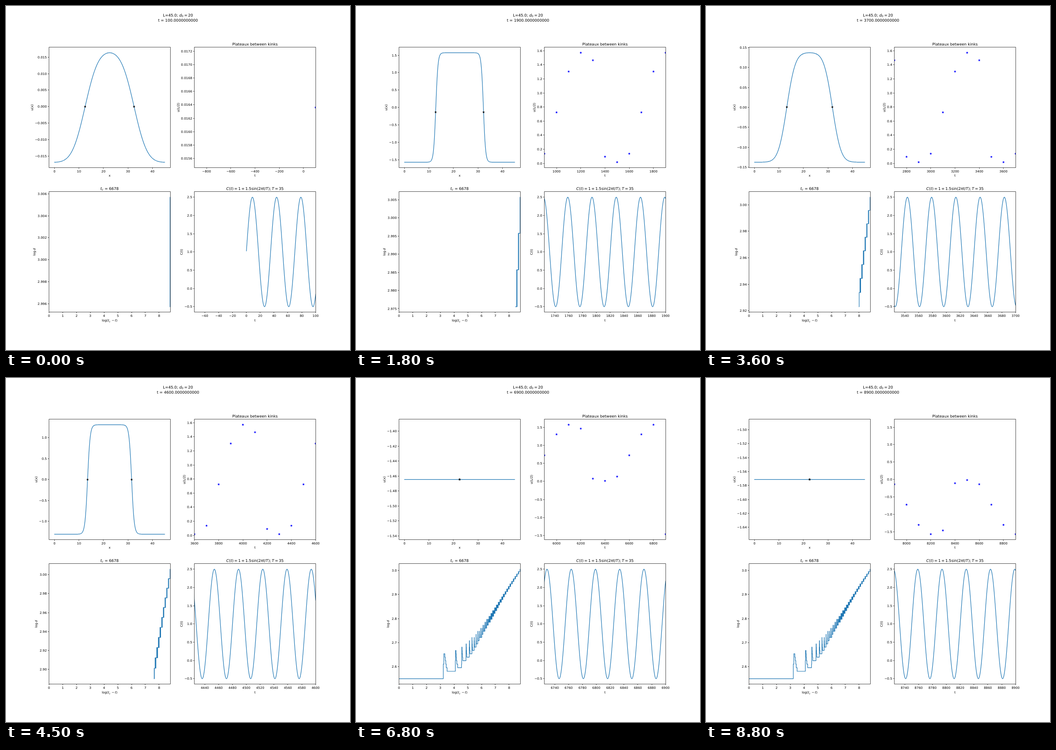
These frames come from a looping animation (748 px wide and 748 px high, 8900 ms). An HTML page:

```html
<!DOCTYPE html>
<html lang="en">
<head>
<meta charset="utf-8">
<title>Kink dynamics</title>
<style>
  html, body { margin: 0; width: 100%; height: 100%; overflow: hidden; background: #fff; }
  #stage { display: block; width: 748px; height: 748px; }
  text { font-family: "DejaVu Sans", sans-serif; text-rendering: geometricPrecision; white-space: pre; }
  .i { font-style: italic; }
  .axis { fill: none; stroke: #000; stroke-width: .7; }
  .line { fill: none; stroke: #1f77b4; stroke-width: 1.2; stroke-linejoin: round; stroke-linecap: square; }
  .star { stroke-width: .69; stroke-linejoin: bevel; }
</style>
</head>
<body>
<svg id="stage" viewBox="0 0 748 748"></svg>
<script>
const SIZE = 748, PT = SIZE / 15 / 72;
const SMALL = 10 * PT, LARGE = 12 * PT, TICK = 3.5 * PT;
const W = .775 * SIZE / 2.2, H = .77 * SIZE / 2.2;
const LEFT = [.125 * SIZE, .9 * SIZE - W], TOP = [.12 * SIZE, .89 * SIZE - H];

const LENGTH = 45, PERIOD = 35, T_END = 8900, T_C = 6678, STEP_MS = 100;
const forcing = t => 1 + 1.5 * Math.sin(2 * Math.PI * t / PERIOD);

// u_t = u_xx + C(t) u - u^3 on the left half of a mirror-symmetric domain
const N = 225, DX = LENGTH / 2 / N, DT = .1;
const START_KINK = 12.5, LAST_KINK = 16.2;
const sweep = new Float64Array(N + 1);

// Crank-Nicolson for the linear part, explicit cubic; tridiagonal solve
function advance(u, next, t) {
  const r = DT / 2 / (DX * DX);
  const keep = 1 - 2 * r + DT / 2 * forcing(t), diag = 1 + 2 * r - DT / 2 * forcing(t + DT);
  for (let i = 0; i <= N; i++) {
    const a = i ? u[i - 1] : u[1], b = i < N ? u[i + 1] : u[N - 1], v = u[i];
    const rhs = keep * v + r * (a + b) - DT * v * v * v;
    const low = i === 0 ? 0 : i === N ? 2 * r : r;
    const pivot = diag - (i ? low * sweep[i - 1] : 0);
    sweep[i] = (i ? r : 2 * r) / pivot;
    next[i] = (rhs + (i ? low * next[i - 1] : 0)) / pivot;
  }
  for (let i = N - 1; i >= 0; i--) next[i] += sweep[i] * next[i + 1];
}

// position of the steepest rise
function steepest(u) {
  const slope = i => u[i + 1] - u[i];
  let best = 1;
  for (let i = 2; i < N - 1; i++) if (slope(i) > slope(best)) best = i;
  const a = slope(best - 1), b = slope(best), c = slope(best + 1), bend = a - 2 * b + c;
  return (best + .5 + (bend ? .5 * (a - c) / bend : 0)) * DX;
}

// Shifts time by whole periods so the kinks reach LAST_KINK in the period before T_C.
function simulate() {
  const states = [], kinks = [];
  let shift = null, next = new Float64Array(N + 1);
  let u = next.map((_, i) => Math.tanh(i * DX - START_KINK));
  for (let s = 0; s <= (shift ?? 5000) + T_END; s++) {
    if (s % 5 === 0) states.push(u.slice());
    kinks.push(steepest(u));
    if (shift === null && s % PERIOD === 15 && kinks[s] > LAST_KINK - .05) {
      shift = Math.round((s - T_C) / PERIOD) * PERIOD;
    }
    for (let k = 0; k < 10; k++) {
      advance(u, next, s + k * DT);
      [u, next] = [next, u];
    }
  }
  const index = t => {
    let s = t + shift;
    while (s < 0) s += PERIOD;
    return s;
  };
  const rawKink = t => kinks[index(t)];
  const offset = START_KINK + .02 - rawKink(15);
  return {
    state: t => states[index(t) / 5],
    kink: t => Math.floor((rawKink(t) + offset) * 10) / 10
  };
}

const { state, kink } = simulate();
const logD = Array.from({ length: T_C }, (_, t) => Math.log(LENGTH - 2 * kink(t)));

const fix = v => v.toFixed(2);
const italic = s => `<tspan class="i">${s}</tspan>`;
const sub = (s, rest) =>
  `<tspan font-size="70%" dy="1.3">${s}</tspan><tspan dy="-1.3">${rest}</tspan>`;
const text = (x, y, s, size = SMALL, anchor = 'middle', extra = '') =>
  `<text x="${fix(x)}" y="${fix(y)}" font-size="${fix(size)}" text-anchor="${anchor}" ${extra}>${s}</text>`;
const polyline = pts => `<path class="line" d="M${pts.map(p => p.map(fix).join(' ')).join('L')}"/>`;

function star([x, y], color) {
  const pts = Array.from({ length: 10 }, (_, k) => {
    const r = 3 * PT * (k % 2 ? .382 : 1), a = k * Math.PI / 5;
    return fix(x + r * Math.sin(a)) + ',' + fix(y - r * Math.cos(a));
  });
  return `<polygon class="star" fill="${color}" stroke="${color}" points="${pts.join(' ')}"/>`;
}

// data limits with a 5 % margin; a constant is widened first
function limits(values) {
  let lo = Infinity, hi = -Infinity;
  for (const v of values) { lo = Math.min(lo, v); hi = Math.max(hi, v); }
  if (hi - lo < 1e-9) { lo -= .05 * Math.abs(lo); hi += .05 * Math.abs(hi); }
  const pad = .05 * (hi - lo);
  return [lo - pad, hi + pad];
}

function ticks([lo, hi]) {
  const raw = (hi - lo) / 9, base = 10 ** Math.floor(Math.log10(raw));
  const step = base * [1, 2, 2.5, 5, 10].find(m => m * base >= raw * (1 - 1e-9));
  let digits = 0;
  while (Math.abs(step * 10 ** digits - Math.round(step * 10 ** digits)) > 1e-6) digits++;
  const out = [];
  for (let k = Math.ceil(lo / step - 1e-6); k * step <= hi + step * 1e-6; k++) {
    const label = Math.abs(k * step).toFixed(digits);
    out.push({ value: k * step, label: (k < 0 ? '\u2212' : '') + label });
  }
  return out;
}

const tickWidth = s => SMALL * [...s].reduce((w, c) => w + (c === '.' ? .318 : c === '\u2212' ? .838 : .636), 0);

function panel(col, row, xlim, ylim, labels, draw) {
  const left = LEFT[col], top = TOP[row], bottom = top + H, mid = left + W / 2;
  const sx = x => (x - xlim[0]) / (xlim[1] - xlim[0]) * W;
  const sy = y => (ylim[1] - y) / (ylim[1] - ylim[0]) * H;
  const snap = v => Math.floor(v) + .5;
  const x0 = snap(left), x1 = snap(left + W), y0 = snap(top), y1 = snap(bottom);
  let marks = `M${x0} ${y0}H${x1}V${y1}H${x0}Z`, out = '', widest = 0;
  for (const { value, label } of ticks(xlim)) {
    const x = left + sx(value);
    marks += `M${snap(x)} ${y1}v${fix(TICK)}`;
    out += text(x, bottom + 2 * TICK + .76 * SMALL, label);
  }
  for (const { value, label } of ticks(ylim)) {
    const y = top + sy(value);
    marks += `M${x0} ${snap(y)}h${fix(-TICK)}`;
    out += text(left - 2 * TICK, y + .364 * SMALL, label, SMALL, 'end');
    widest = Math.max(widest, tickWidth(label));
  }
  const yx = left - 2 * TICK - widest - 4 * PT - (labels.yGap ?? 1), yy = top + H / 2;
  out += text(mid, bottom + (labels.xGap ?? 19.8), labels.x);
  out += text(yx, yy, labels.y, SMALL, 'middle', `transform="rotate(-90 ${fix(yx)} ${fix(yy)})"`);
  if (labels.title) out += text(mid, top - 6 * PT, labels.title, LARGE);
  return `<svg x="${fix(left)}" y="${fix(top)}" width="${fix(W)}" height="${fix(H)}">` +
    draw((x, y) => [sx(x), sy(y)]) + `</svg><path class="axis" d="${marks}"/>` + out;
}

function profilePanel(t) {
  const half = [...state(t)];
  const full = half.concat(half.slice(0, N).reverse());
  const left = half[N] > 0 ? kink(t) : LENGTH / 2;
  const height = half[Math.round(left / DX)];
  return panel(0, 0, limits([0, LENGTH]), limits(half), { x: 'x', y: 'u(x)' }, p =>
    polyline(full.map((v, i) => p(i * DX, v))) +
    [left, LENGTH - left].map(x => star(p(x, height), '#000')).join(''));
}

function plateauPanel(t) {
  const heights = Array.from({ length: t / 100 }, (_, k) => state(100 * (k + 1))[N]);
  return panel(1, 0, [t - 1000, t], limits(heights),
    { title: 'Plateaux between kinks', x: 't', y: 'u(L/2)' }, p =>
      heights.map((h, k) => [100 * (k + 1), h]).filter(([x]) => x >= t - 1000)
        .map(([x, h]) => star(p(x, h), '#00f')).join(''));
}

function distancePanel(t) {
  const seen = logD.slice(0, t + 1);
  const labels = {
    title: italic('t') + sub(italic('c'), ' = 6678'),
    x: 'log(' + italic('t') + sub(italic('c'), '\u2009\u2009\u2212\u2009' + italic('t') + ')'),
    y: 'log\u2009' + italic('d'),
    xGap: 20.7, yGap: 2.4
  };
  return panel(0, 1, [0, Math.log(T_C)], limits(seen), labels, p => {
    const pts = [];
    seen.forEach((v, s) => {
      const x = Math.log(T_C - s);
      if (s && v !== seen[s - 1]) pts.push(p(x, seen[s - 1]));
      if (!s || v !== seen[s - 1] || s === seen.length - 1) pts.push(p(x, v));
    });
    return polyline(pts);
  });
}

function forcingPanel(t) {
  const title = italic('C') + '(' + italic('t') + ')\u2009=\u20091\u2009+\u20091.5sin(2' +
    italic('\u03c0t') + '/' + italic('T') + ');\u2009' + italic('T') + '\u2009=\u200935';
  return panel(1, 1, [t - 175, t], limits([-.5, 2.5]), { title, x: 't', y: 'C(t)' }, p => {
    const pts = [];
    for (let s = Math.max(.1, t - 176); s < t + .2; s += .25) pts.push(p(s, forcing(s)));
    return polyline(pts);
  });
}

const stage = document.getElementById('stage');

function render(t) {
  stage.innerHTML =
    text(SIZE / 2, 23, 'L=45.0; ' + italic('d') + sub('0', '\u2009=\u200920'), LARGE) +
    text(SIZE / 2, 33.9, `t = ${t.toFixed(10)}`, LARGE) +
    profilePanel(t) + plateauPanel(t) + distancePanel(t) + forcingPanel(t);
}

const start = performance.now();
let shown = -1;

function tick() {
  const elapsed = Math.max(0, performance.now() - start) % T_END;
  const step = Math.floor(elapsed / STEP_MS);
  if (step !== shown) render(100 * ((shown = step) + 1));
  requestAnimationFrame(tick);
}
tick();
</script>
</body>
</html>
```
